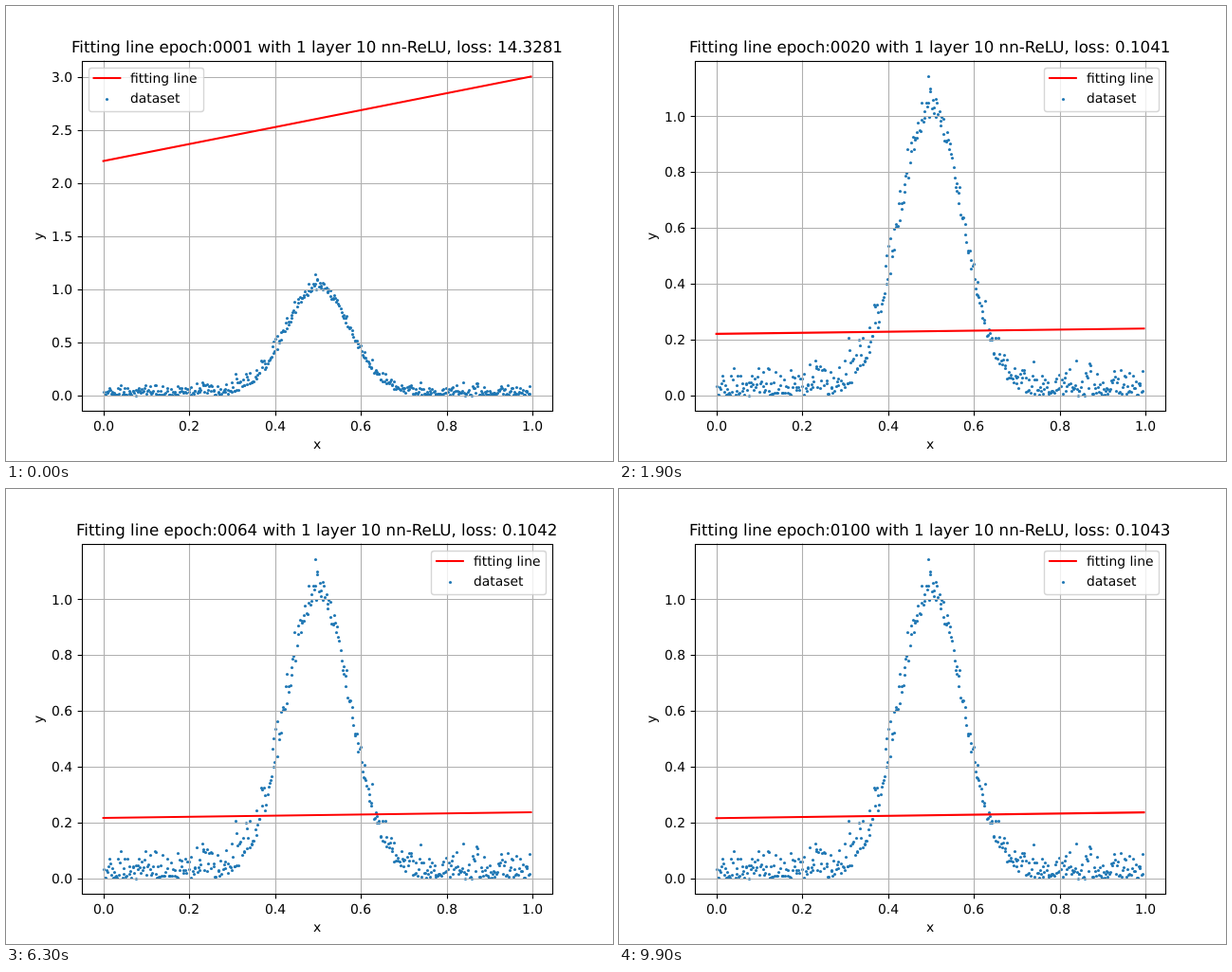
Recreate the animation shown at these times as an HTML page with a canvas. Size 640 by 480 pixels, loop 10 s.

```html
<!DOCTYPE html>
<html lang="en">
<head>
<meta charset="utf-8">
<title>Fitting line</title>
<style>
  html, body { margin: 0; width: 100%; height: 100%; overflow: hidden; background: #fff; }
  canvas { display: block; width: 640px; height: 480px; }
</style>
</head>
<body>
<canvas id="plot" width="640" height="480"></canvas>
<script>
const ctx = document.getElementById('plot').getContext('2d');
const PT = 100 / 72;
const EM = 10 * PT;
const BOX = { l: 80, r: 576, t: 57.6, b: 427.2 };
const BASE = 410.6, SPAN = 336.2;   // pixel row of y = 0, pixels up to the highest value
const DATA_TOP = 1.1425, X_MAX = 0.9965;
const EPOCHS = 100, STEP_MS = 100;

const toX = x => 102.65 + 452.4 * x;
const snap = v => Math.round(v) + 0.5;

function makeRandom(seed) {
  return () => {
    seed = (seed + 0x6D2B79F5) | 0;
    let t = Math.imul(seed ^ (seed >>> 15), 1 | seed);
    t = (t + Math.imul(t ^ (t >>> 7), 61 | t)) ^ t;
    return ((t ^ (t >>> 14)) >>> 0) / 4294967296;
  };
}

// A bell curve plus half-normal noise
function makeData(count) {
  const rand = makeRandom(17);
  const points = [{ x: 0.494, y: DATA_TOP }, { x: 0.308, y: 0.206 }];
  for (let i = 0; i < count; i++) {
    const x = X_MAX * (i + rand()) / count;
    const normal = Math.sqrt(-2 * Math.log(1 - rand())) * Math.cos(2 * Math.PI * rand());
    const noise = Math.min(Math.abs(normal) * 0.05, 0.125);
    points.push({ x, y: Math.exp(-((x - 0.5) ** 2) / 0.0109) + noise });
  }
  return points;
}
const data = makeData(450);

// State of the fit after k steps of descent
function fit(k) {
  const rate = 0.265 * k + 0.0043 * k * k + 0.27 * (1 - Math.exp(-k));
  const gap = 2.383 * Math.exp(-rate);
  const drift = k / (EPOCHS - 1);
  const mid = 0.2272 - 0.0015 * drift + gap;
  const slope = 0.0185 + 0.0025 * drift + 0.7815 * Math.exp(-0.564 * k);
  const loss = 0.10408 + 0.00025 * drift + gap * gap * (1.37 + 1.13481 * Math.exp(-k));
  return { at: x => mid + slope * (x - 0.5), loss };
}

function tickStep(range) {
  return [0.1, 0.2, 0.25, 0.5, 1].find(s => s >= range / 9);
}

function stroke(color, width, x1, y1, x2, y2, cap = 'butt') {
  ctx.strokeStyle = color;
  ctx.lineWidth = width;
  ctx.lineCap = cap;
  ctx.beginPath();
  ctx.moveTo(x1, y1);
  ctx.lineTo(x2, y2);
  ctx.stroke();
}

function dot(x, y) {
  ctx.fillStyle = '#1f77b4';
  ctx.beginPath();
  ctx.arc(snap(x), snap(y), 1.55, 0, 2 * Math.PI);
  ctx.fill();
}

// align: 0 left, 0.5 centre, 1 right
function text(str, x, y, align = 0, size = EM) {
  ctx.font = size + 'px "DejaVu Sans", sans-serif';
  ctx.textRendering = 'geometricPrecision';
  ctx.fillStyle = '#000';
  ctx.fillText(str, Math.round(x - ctx.measureText(str).width * align), Math.round(y));
}

function legend(left) {
  ctx.beginPath();
  ctx.roundRect(Math.floor(left) + 0.5, 65.5, 121, 46, 2.8);
  ctx.fillStyle = 'rgba(255,255,255,0.8)';
  ctx.fill();
  ctx.strokeStyle = 'rgba(204,204,204,0.8)';
  ctx.lineWidth = PT;
  ctx.stroke();
  stroke('#f00', 1.5 * PT, left + 5.56, 76, left + 33.33, 76, 'square');
  dot(left + 19.4, 98);
  text('fitting line', left + 44.4, 81);
  text('dataset', left + 44.4, 102);
}

function draw(epoch) {
  const { at, loss } = fit(epoch - 1);
  const start = at(0), end = at(X_MAX);
  const top = Math.max(DATA_TOP, end);
  const toY = y => BASE - y * SPAN / top;
  const step = tickStep(top * 1.1);
  const digits = step === 0.25 ? 2 : 1;

  ctx.fillStyle = '#fff';
  ctx.fillRect(0, 0, 640, 480);

  for (const p of data) dot(toX(p.x), toY(p.y));

  const thin = 0.8 * PT, tick = 3.5 * PT;
  for (let i = 0; i <= 5; i++) {
    const v = i / 5, x = snap(toX(v));
    stroke('#b0b0b0', thin, x, BOX.t, x, BOX.b);
    stroke('#000', thin, x, 427.5, x, 427.5 + tick);
    text(v.toFixed(1), toX(v), 448, 0.5);
  }
  for (let v = 0; v <= top * 1.05; v += step) {
    const y = snap(toY(v));
    stroke('#b0b0b0', thin, BOX.l, y, BOX.r, y);
    stroke('#000', thin, 80.5 - tick, y, 80.5, y);
    text(v.toFixed(digits), 70.3, toY(v) + 5.2, 1);
  }

  stroke('#f00', 1.5 * PT, toX(0), toY(start), toX(X_MAX), toY(end), 'square');

  ctx.strokeStyle = '#000';
  ctx.lineWidth = thin;
  ctx.strokeRect(80.5, 58.5, 496, 369);

  text('x', 328, 467, 0.5);
  ctx.save();
  ctx.translate(digits === 2 ? 30 : 39, 243);
  ctx.rotate(-Math.PI / 2);
  text('y', 0, 0, 0.5);
  ctx.restore();

  const count = String(epoch).padStart(4, '0');
  text(`Fitting line epoch:${count} with 1 layer 10 nn-ReLU, loss: ${loss.toFixed(4)}`,
    328, 49, 0.5, 12 * PT);

  legend(toY(end) > 112 ? 448.5 : 87);
}

let shown = 0;
function tickFrame() {
  const epoch = Math.floor(performance.now() / STEP_MS) % EPOCHS + 1;
  if (epoch !== shown) draw(shown = epoch);
  requestAnimationFrame(tickFrame);
}
tickFrame();
</script>
</body>
</html>
```
